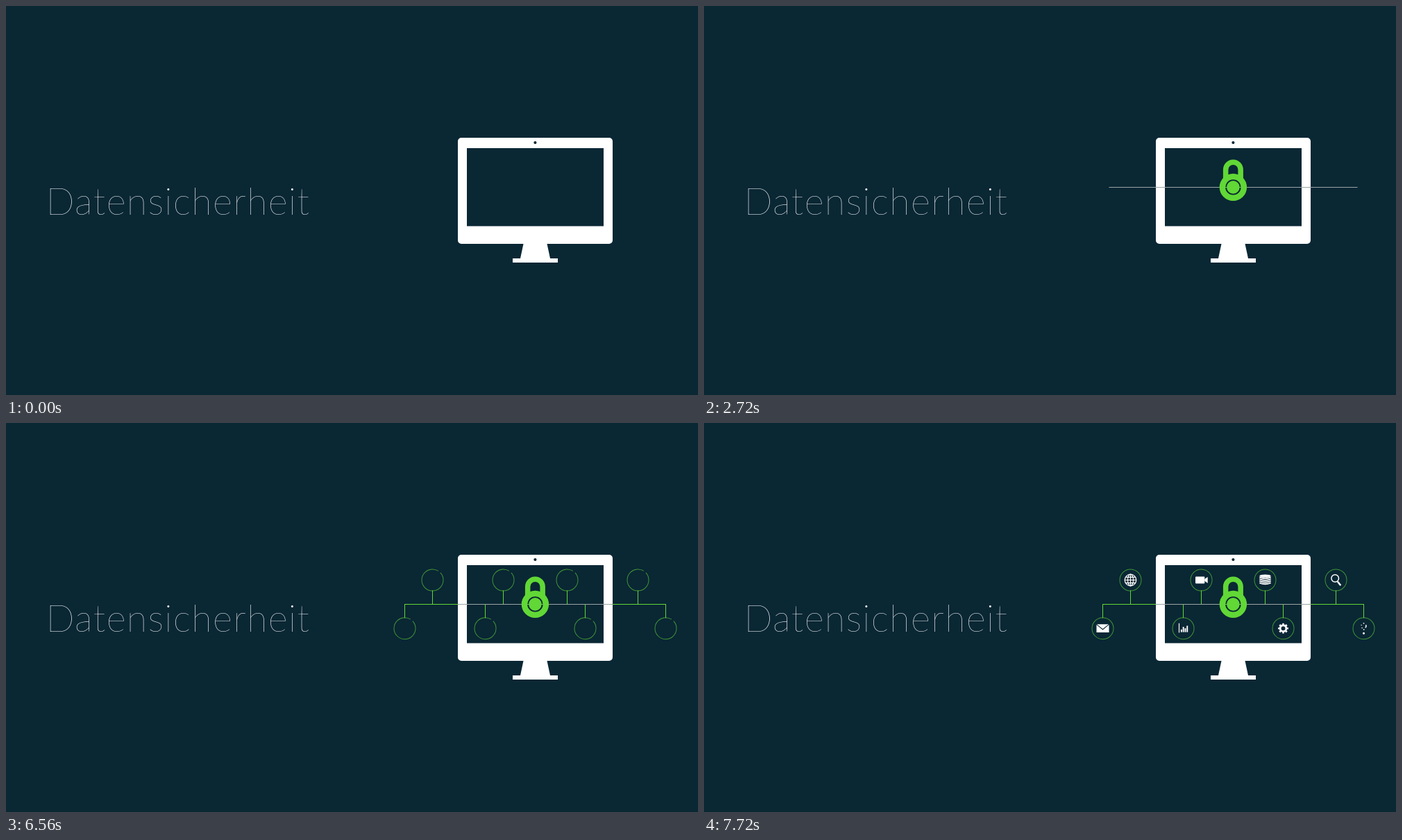
Write an HTML page that moves like this. It is 997 by 561 pixels and loops after 8.24 s.

```html
<!DOCTYPE html>
<html lang="de">
<head>
<meta charset="utf-8">
<title>Datensicherheit</title>
<style>
html, body { margin: 0; width: 100%; height: 100%; overflow: hidden; background: #0a2734; }
svg { display: block; width: 100vw; height: 100vh; }
text { font: 200 54px Lato, "Open Sans", sans-serif; letter-spacing: 1.3px; fill: #fff; }
.wire { fill: none; stroke: #61d836; stroke-width: 1; }
.icon { fill: #fff; stroke: none; }
.icon .line { fill: none; stroke: #fff; }
</style>
</head>
<body>
<svg viewBox="0 0 997 561">
  <rect width="997" height="561" fill="#0a2734"/>
  <text x="57.5" y="301">Datensicherheit</text>

  <g fill="#fff">
    <path fill-rule="evenodd" d="M656 190H869a5 5 0 0 1 5 5V338a5 5 0 0 1 -5 5H656a5 5 0 0 1 -5 -5V195a5 5 0 0 1 5 -5ZM664 205V317.5H861V205Z"/>
    <path d="M745.5 343H779.5L784 364H795V370H730V364H741Z"/>
    <circle cx="762.4" cy="197" r="2.1" fill="#0a2734"/>
  </g>

  <path id="bus" stroke="#9aa6a6" fill="none"/>
  <path id="ends" class="wire" d="M574 261.5H651M874 261.5H951"/>
  <path id="ticks" class="wire"/>
  <g id="rings" class="wire" stroke-opacity=".62"></g>

  <g fill="#61d836">
    <g id="body" fill-rule="evenodd">
      <path d="M747.9 250V236a14.5 14.5 0 0 1 29 0V250H769.4V236a7 7 0 0 0 -14 0V250Z"/>
      <path d="M742.7 261.4a19.7 19.7 0 0 1 39.4 0a19.7 19.7 0 0 1 -39.4 0ZM751.2 261.4a11.2 11.2 0 0 0 22.4 0a11.2 11.2 0 0 0 -22.4 0Z"/>
    </g>
    <circle id="disc" cx="762.4" cy="261.4"/>
  </g>

  <g id="icons"></g>
</svg>
<script>
const LOOP = 8240, STEP = 40, MID = 762.5, BUS_Y = 261.5;
const $ = id => document.getElementById(id);
const clamp = v => Math.max(0, Math.min(1, v));
const span = (t, a, b) => clamp((t - a) / (b - a));
const ease = p => (1 - Math.cos(Math.PI * p)) / 2;
const set = (el, attrs) => { for (const k in attrs) el.setAttribute(k, attrs[k]); };

const add = (parent, name, attrs) => {
  const el = document.createElementNS('http://www.w3.org/2000/svg', name);
  set(el, attrs);
  return parent.appendChild(el);
};

function layer(y) {
  return `<path d="M-8.2 ${y}Q0 ${y + 3.2} 8.2 ${y}V${y + 1.9}Q0 ${y + 5.1} -8.2 ${y + 1.9}Z"/>`;
}

const bar = (x, h) => `<rect x="${x}" y="${5.4 - h}" width="1.9" height="${h}"/>`;

const art = {
  globe: `<g class="line" stroke-width="1.2"><circle r="8.3"/><ellipse rx="4" ry="8.3"/>
    <path d="M0 -8.3V8.3M-8.3 0H8.3M-7 -4.2H7M-7 4.2H7"/></g>`,
  camera: '<rect x="-8.5" y="-5" width="13.3" height="10" rx="1"/><path d="M4.8 -1.5L9.2 -4.4V4.4L4.8 1.5Z"/>',
  store: '<ellipse cy="-5.9" rx="8.2" ry="2.2"/>' + [-4.9, -2.2, 0.5, 3.2].map(layer).join(''),
  search: `<circle class="line" cx="-1.3" cy="-2.5" r="5.3" stroke-width="1.5"/>
    <path class="line" d="M2.4 2.2L6.8 7.8" stroke-width="2.4"/>`,
  mail: '<path d="M-8.4 -5.9H8.4L0 .9ZM-9 -5.2L0 2.2L9 -5.2V5.9H-9Z"/>',
  chart: '<rect x="-6.6" y="-7.4" width="1.2" height="13.6"/>' +
    bar(-3.6, 3.8) + bar(-.8, 7.6) + bar(2, 5.6) + bar(4.8, 9.2),
  gear: `<circle class="line" r="4.4" stroke-width="2.9"/>
    <circle class="line" r="6.3" stroke-width="2.2" pathLength="16" stroke-dasharray="1 1" stroke-dashoffset=".5"/>`,
  query: `<circle cy="-7.4" r=".9"/><circle cx="-3.4" cy="-4.8" r=".7"/>
    <path class="line" d="M3 -5Q4.4 -2.6 2.2 -.9" stroke-width="1.4"/>
    <circle cx="-2.4" cy="-.6" r=".8"/><circle cx=".2" cy="1.6" r=".9"/><circle cy="7" r="1.5"/>`
};

// [name, x, direction of the branch]
const nodes = [
  ['mail', 574.5, 1], ['globe', 614.5, -1], ['chart', 690.5, 1], ['camera', 716.5, -1],
  ['store', 808.5, -1], ['gear', 834.5, 1], ['search', 910.5, -1], ['query', 950.5, 1]
].map(([name, x, dir]) => {
  const y = dir < 0 ? 226.5 : 296.2;
  const ring = add($('rings'), 'circle', {
    cx: x, cy: y, r: 15.5, pathLength: 1, transform: `rotate(-43 ${x} ${y})`
  });
  const icon = add($('icons'), 'g', { class: 'icon' });
  icon.innerHTML = art[name];
  return { x, y, dir, ring, icon };
});

function draw(t) {
  const discP = span(t, 500, 870), bodyP = span(t, 680, 1320);
  set($('disc'), { r: 9.3 * (1 + 4.3 * (1 - ease(discP))), opacity: span(t, 500, 960) });
  const k = 0.93 + 0.07 * ease(bodyP);
  set($('body'), {
    opacity: ease(bodyP) * 0.6 + bodyP * 0.4,
    transform: `translate(${MID} 251) scale(${k}) translate(${-MID} -251)`
  });

  const half = t < 1360 ? 0 : 188.5 * ease(span(t, 1113, 2990));
  set($('bus'), { d: `M${MID - half} ${BUS_Y}H${MID + half}` });

  const tick = ease(span(t, 3160, 4800));
  set($('ends'), { opacity: tick });
  set($('ticks'), {
    d: nodes.map(n => `M${n.x} ${n.dir < 0 ? 241.5 : 261.5}v${19.8 * tick}`).join('')
  });

  const sweep = ease(span(t, 4950, 6800));
  const scale = 1 + 7 * (1 - ease(span(t, 6720, 7500)));
  const fade = Math.pow(span(t, 6720, 7720), 1.85);
  for (const n of nodes) {
    set(n.ring, { 'stroke-dasharray': sweep < 1 ? `${sweep} 2` : 'none' });
    set(n.icon, { transform: `translate(${n.x} ${n.y}) scale(${scale})` });
  }
  set($('icons'), { opacity: fade });
  $('icons').style.filter = scale > 1.05 ? `blur(${0.4 * (scale - 1)}px)` : 'none';
}

const start = performance.now();
function tickFrame() {
  const t = (performance.now() - start) % LOOP;
  draw(Math.floor(t / STEP) * STEP);
  requestAnimationFrame(tickFrame);
}
tickFrame();
</script>
</body>
</html>
```
